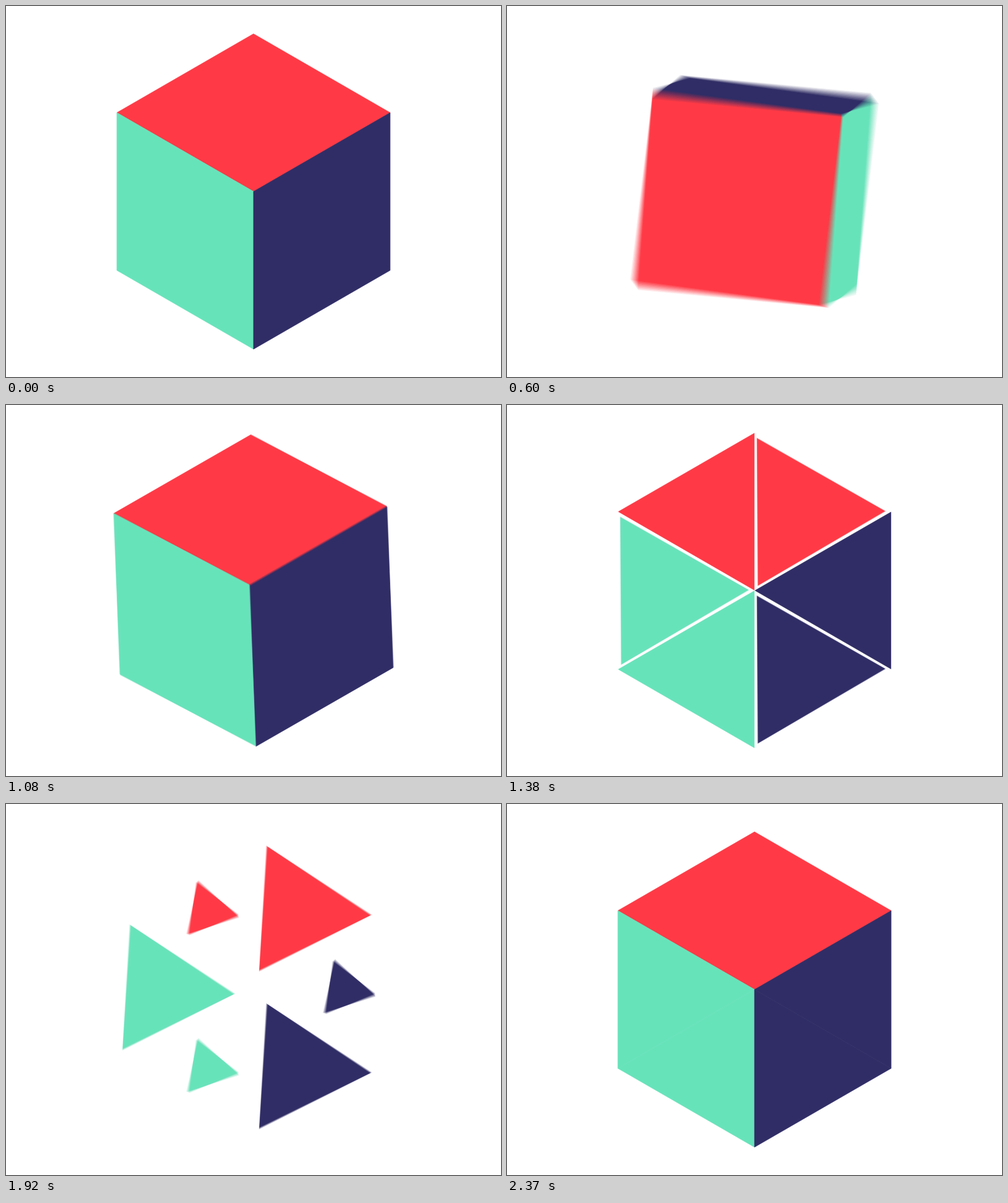
An HTML page with a canvas for the animation above (2.4 s loop, 800x600 px).

```html
<!DOCTYPE html>
<html lang="en">
<head>
<meta charset="utf-8">
<title>Cube and triangles</title>
<style>
  html, body { margin: 0; width: 100%; height: 100%; overflow: hidden; background: #fff; }
  canvas { display: block; width: 800px; height: 600px; }
</style>
</head>
<body>
<canvas id="stage" width="800" height="600"></canvas>
<script>
const W = 800, H = 600, CX = 400, CY = 300;
const LOOP = 2400, HALF = LOOP / 2, STEP = 30;
const SHUTTER = 15, SAMPLES = 12;
const RADIUS = 255;                       // projected cube edge
const EDGE = RADIUS * Math.sqrt(1.5);
const RED = '#ff3a46', GREEN = '#67e3ba', NAVY = '#302d66';
const RAD = Math.PI / 180;

const out = document.getElementById('stage').getContext('2d');
const layer = document.createElement('canvas');
layer.width = W;
layer.height = H;
const ctx = layer.getContext('2d');

// One motion runs ahead of time, its partner behind.
const SKEW = 1.31;
const late = x => x ** SKEW;
const early = x => 1 - late(1 - x);

const cubic = p => p < 0.5 ? 4 * p ** 3 : 1 - 4 * (1 - p) ** 3;
const smooth = p => p * p * (3 - 2 * p);
const smoother = p => p ** 3 * (p * (6 * p - 15) + 10);
const mix = (a, ka, b, kb) => a.map((v, i) => v * ka + b[i] * kb);

function polygon(points, color) {
  ctx.beginPath();
  points.forEach(([x, y]) => ctx.lineTo(x, y));
  ctx.closePath();
  ctx.fillStyle = ctx.strokeStyle = color;
  ctx.lineWidth = 0.7;
  ctx.lineJoin = 'round';
  ctx.fill();
  ctx.stroke();
}

// Face normals of the isometric pose: x right, y down, z to the viewer.
const S2 = Math.SQRT1_2, S3 = Math.sqrt(1 / 3), S6 = Math.sqrt(1 / 6);
const TOP = [0, -2 * S6, S3], LEFT = [-S2, S6, S3], RIGHT = [S2, S6, S3];

function drawCube(u) {
  const a = Math.PI * smoother(early(u));
  const b = Math.PI * smoother(late(u));
  const green = mix(LEFT, Math.cos(a), RIGHT, Math.sin(a));
  const side = mix(LEFT, -Math.sin(a), RIGHT, Math.cos(a));
  const navy = mix(side, Math.cos(b), TOP, Math.sin(b));
  const red = mix(TOP, Math.cos(b), side, -Math.sin(b));
  const axes = [[red, RED], [green, GREEN], [navy, NAVY]];
  axes.forEach(([n, color], i) => {
    const p = axes[(i + 1) % 3][0], q = axes[(i + 2) % 3][0];
    const dir = n[2] < 0 ? -1 : 1;        // opposite faces share a colour
    const corner = (s, t) => [0, 1].map(k =>
      [CX, CY][k] + EDGE / 2 * (dir * n[k] + s * p[k] + t * q[k]));
    polygon([corner(-1, -1), corner(1, -1), corner(1, 1), corner(-1, 1)], color);
  });
}

// Triangle centres on the grid DX by DY: [column, row, points left, colour]
const DX = RADIUS * Math.sqrt(3) / 6, DY = RADIUS / 2;
const TRIANGLES = [
  [-1, -1, true, RED], [1, -1, false, RED],
  [-1, 1, true, GREEN], [-2, 0, false, GREEN],
  [2, 0, true, NAVY], [1, 1, false, NAVY]
];

function drawTriangles(v) {
  for (const [col, row, left, color] of TRIANGLES) {
    const e = cubic(left ? late(v) : early(v));
    const r = RADIUS / Math.sqrt(3) * (1 - 0.67 * Math.sin(Math.PI * e));
    const turn = 120 * smooth(e) * (left ? 1 : -1) + (left ? 180 : 0);
    polygon([0, 120, 240].map(k => [
      CX + col * DX + r * Math.cos((turn + k) * RAD),
      CY + row * DY + r * Math.sin((turn + k) * RAD)
    ]), color);
  }
}

function drawAt(t) {
  ctx.fillStyle = '#fff';
  ctx.fillRect(0, 0, W, H);
  if (t < HALF) drawCube(t / HALF);
  else drawTriangles(t / HALF - 1);
}

// Average several moments for motion blur.
function render(t) {
  for (let i = 0; i < SAMPLES; i++) {
    drawAt((t + SHUTTER * (i + 0.5) / SAMPLES) % LOOP);
    out.globalAlpha = 1 / (i + 1);
    out.drawImage(layer, 0, 0);
  }
}

const start = performance.now();
let shown = -1;
function tick() {
  const now = (performance.now() - start) % LOOP;
  const t = Math.floor(now / STEP) * STEP;
  if (t !== shown) render(shown = t);
  requestAnimationFrame(tick);
}
tick();
</script>
</body>
</html>
```
